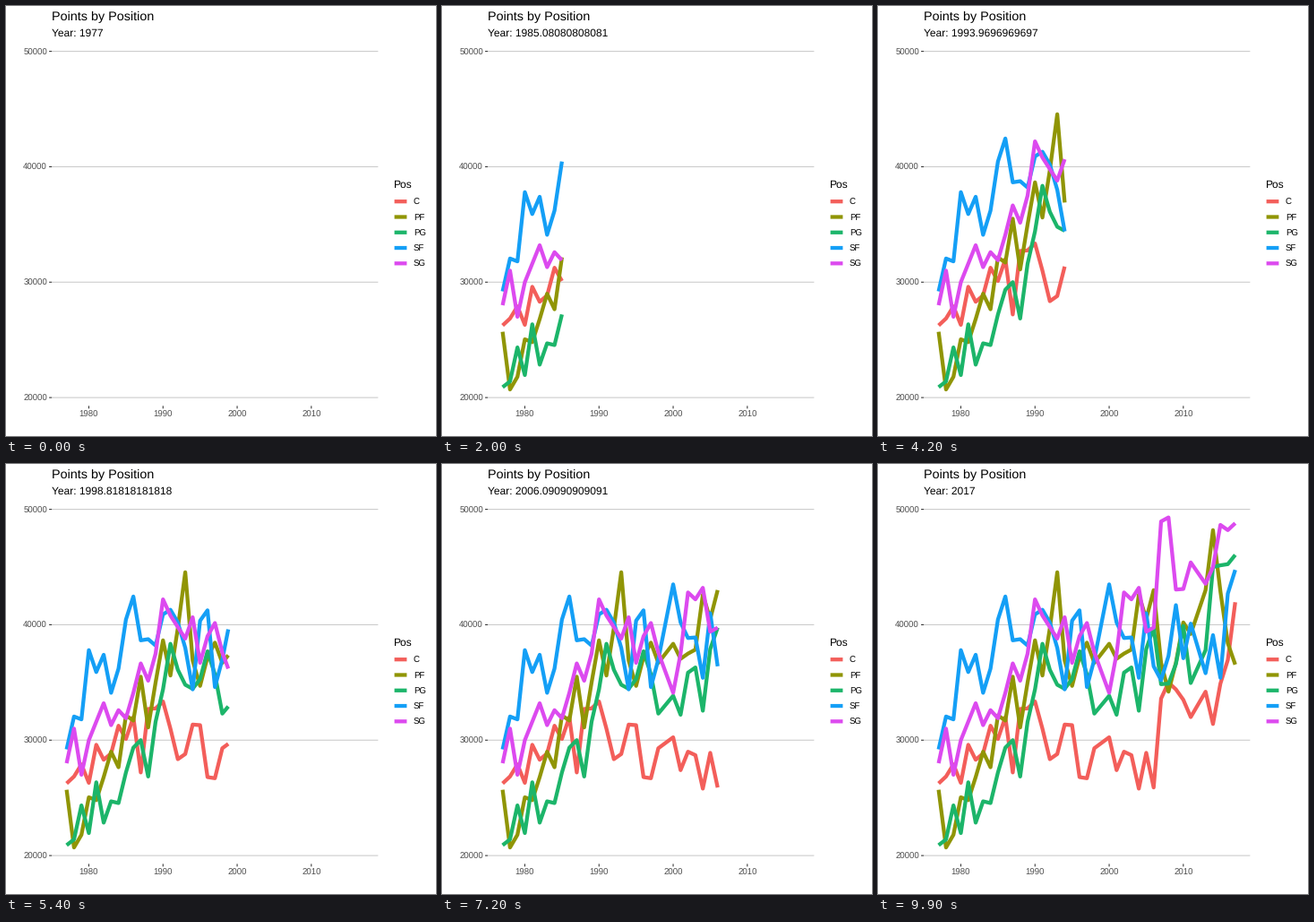
A matplotlib script that plays this animation: 480 px wide and 480 px high, repeating every 10 s.

```python
import matplotlib.pyplot as plt
import numpy as np
from matplotlib.animation import FuncAnimation

SIZE, DPI = 480, 96
PT = 72 / DPI  # points per pixel
FRAMES = 100
START, END = 1977, 2017
LEFT, RIGHT, BOTTOM = 51.1, 415.35, 446.4
THICK, THIN = 4.27 * PT, 1.07 * PT

plt.rcParams["font.family"] = "Liberation Sans"
plt.rcParams["text.hinting"] = "none"

fig = plt.figure(figsize=(SIZE / DPI, SIZE / DPI), dpi=DPI, facecolor="white")
ax = fig.add_axes([0, 0, 1, 1])
ax.set(xlim=(0, SIZE), ylim=(SIZE, 0))
ax.axis("off")

# Two seasons are missing from the data.
years = np.array([y for y in range(START, END + 1) if y not in (1999, 2012)])
# Each year is reached on a whole frame.
keys = np.round((years - START) * (FRAMES - 1) / (END - START))


def px(year):
    return 67.65 + (year - START) * 8.278


def py(points):
    return 437.1 - (points - 20000) * 0.012883


def text(x, y, s, size, color="black", ha="left"):
    return ax.text(x, y, s, size=size * PT, color=color, ha=ha, va="baseline")


def rule(xs, ys, color, width=THIN):
    ax.plot(xs, ys, color=color, lw=width, solid_capstyle="butt", snap=False)


def series(color, *hundreds):
    line, = ax.plot([], [], color=color, lw=THICK, solid_capstyle="butt",
                    solid_joinstyle="round", snap=False)
    return line, np.array(hundreds) * 100


# Axes
for v in range(20000, 50001, 10000):
    y = py(v)
    rule([LEFT, RIGHT], [y, y], "#cbcbcb")
    rule([LEFT - 3, LEFT], [y, y], "#333333")
    text(46, y + 3.8, str(v), 9.6, "#4d4d4d", "right")
for v in range(1980, 2011, 10):
    x = px(v)
    rule([x, x], [BOTTOM, BOTTOM + 3], "#333333")
    text(x, 459, str(v), 9.6, "#4d4d4d", "center")

text(LEFT, 16.2, "Points by Position", 14.4)
subtitle = text(LEFT, 34.1, "", 12)

# Points per position, in hundreds
data = {
    "C": series(
        "#f35e5a",
        262.5, 268.5, 279, 263, 296, 283, 288.5, 312.5, 301, 320, 272, 327,
        327.5, 333.5, 310, 283.5, 288, 313.5, 313, 268, 267, 293, 302.5, 274,
        290, 287, 258, 289, 259, 336, 350, 344, 335, 320, 342, 314, 349,
        369.5, 419.5),
    "PF": series(
        "#909505",
        257, 207, 218, 250.5, 248, 268, 290, 276.5, 321.5, 317, 355, 311,
        350, 386.5, 356, 397, 445.5, 369, 347, 372, 384.5, 367, 383.5, 370.5,
        375, 378.5, 426, 405, 430, 367, 342, 367, 402, 392, 430, 482, 429,
        384, 365.5),
    "PG": series(
        "#1cb56a",
        209, 214, 243.5, 219.5, 263.5, 228.5, 247, 245.5, 272, 293.5, 300,
        268.5, 316, 344, 383.5, 361, 348, 344.5, 353, 377, 357, 323, 338.5,
        322, 358.5, 363, 325.5, 379, 397.5, 348.5, 349, 366, 399, 349.5, 378,
        450, 451.5, 452.5, 460.5),
    "SF": series(
        "#149ff6",
        292, 320.5, 318, 378, 359, 374, 341, 362, 404.5, 424.5, 386.5, 387.5,
        382, 409, 413, 402, 380, 344, 403.5, 412.5, 346, 370, 435, 402,
        388.5, 389, 354, 410, 364, 352, 373, 417, 371, 401, 358, 391, 354,
        427, 447.5),
    "SG": series(
        "#dc4aef",
        280, 310, 270, 300, 316, 332, 313, 326, 319, 341, 366.5, 351.5, 375,
        422, 408, 398, 388, 406.5, 367, 390, 401.5, 376, 341, 375, 428, 422,
        432, 394, 397.5, 489.5, 493, 430.5, 431, 454, 435.5, 450, 486.5, 482,
        488),
}

# Legend
text(431.9, 203.2, "Pos", 12)
for row, (name, (line, _)) in enumerate(data.items()):
    y = 218.2 + row * 17.28
    rule([433.6, 447.4], [y, y], line.get_color(), THICK)
    text(455, y + 3.7, name, 9.6)


def update(i):
    now = START + i * (END - START) / (FRAMES - 1)
    subtitle.set_text(f"Year: {now:.15g}")
    past = keys < i
    xs = np.append(years[past], np.interp(i, keys, years))
    for line, points in data.values():
        ys = np.append(points[past], np.interp(i, keys, points))
        if i == 0:
            line.set_data([], [])
        else:
            line.set_data(px(xs), py(ys))
    return [subtitle, *(line for line, _ in data.values())]


anim = FuncAnimation(fig, update, frames=FRAMES, interval=100,
                     repeat=True, repeat_delay=0, blit=False)
plt.show()
```
